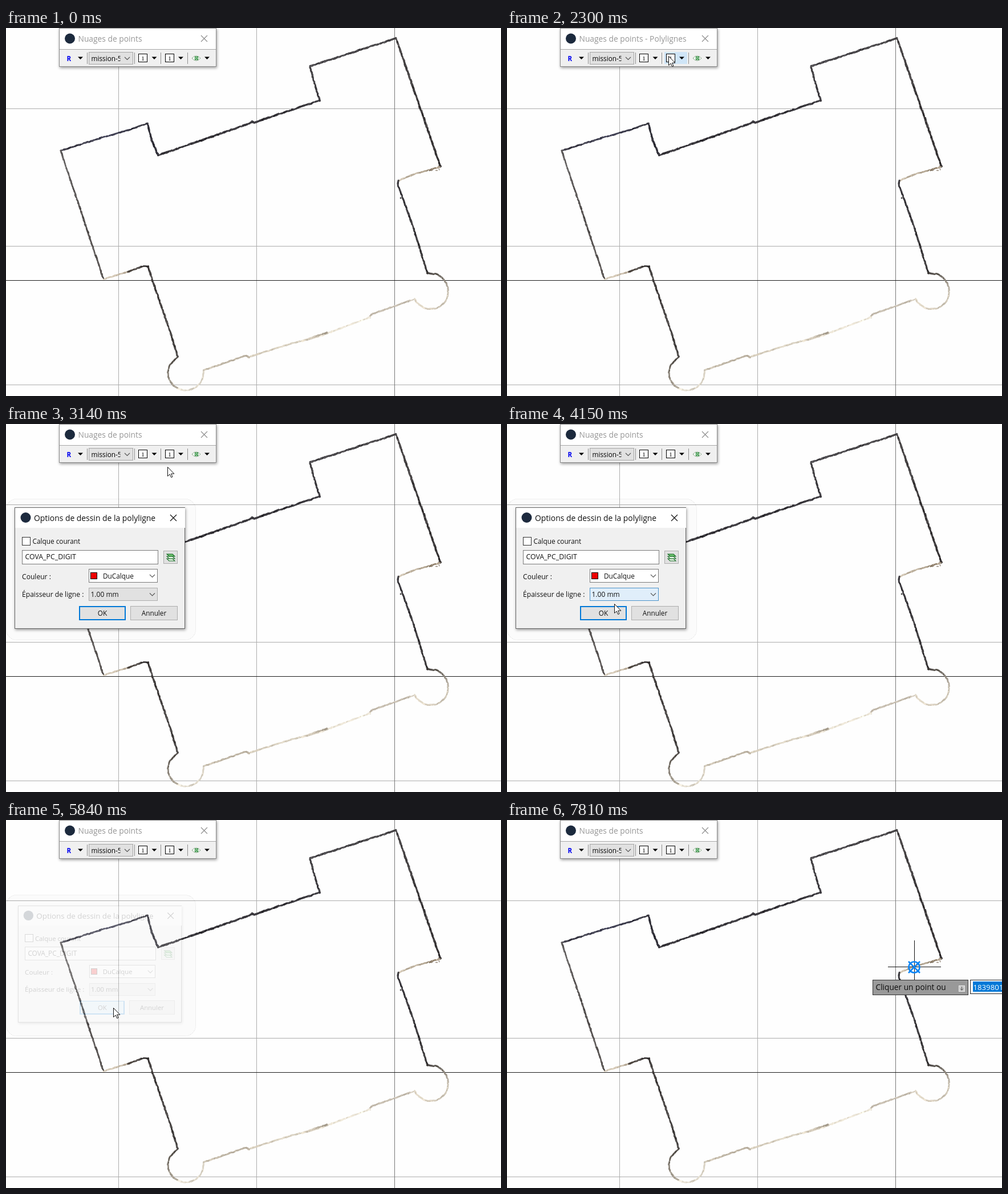
Animation, 868 px wide and 645 px high, one loop 8000 ms. Source, as an HTML page:

```html
<!DOCTYPE html>
<html lang="fr">
<head>
<meta charset="utf-8">
<title>Nuages de points</title>
<style>
html, body { margin: 0; width: 100%; height: 100%; overflow: hidden; background: #fefefe; }
svg { display: block; }
text { font-family: "Open Sans", "Noto Sans", sans-serif; white-space: pre; }
rect, .crisp { shape-rendering: crispEdges; }
.body text { font-size: 11.8px; fill: #111; }
.chev { fill: none; stroke: #555; stroke-width: 1.1; }
</style>
</head>
<body>
<svg width="868" height="645" viewBox="0 0 868 645">
  <defs>
    <filter id="soft" x="-10%" y="-20%" width="120%" height="150%">
      <feDropShadow dx="1" dy="2" stdDeviation="2.5" flood-opacity=".4"/>
    </filter>
    <path id="drop" d="M0 0H9L4.5 4.6Z"/>
    <path id="chev" class="chev" d="M0 0L4.5 4.5L9 0"/>
    <path id="cross" d="M0 0L11 11M11 0L0 11"/>
    <clipPath id="comboClip"><rect x="146" y="42" width="54.5" height="22"/></clipPath>
  </defs>
  <rect width="868" height="645" fill="#fefefe"/>
  <g class="crisp" fill="none" stroke="#adadad">
    <path d="M197.5 0V645M439.5 0V645M0 141.5H868M0 382.5H868M0 625.5H868"/>
    <path d="M681.5 0V645" stroke="#777"/>
    <path d="M0 442.5H868" stroke="#1c1c1c"/>
  </g>
  <g id="cloud" fill="none" stroke-linecap="round"></g>

  <g id="bar" filter="url(#soft)">
    <rect x="93.5" y=".5" width="275" height="67" fill="#fff" stroke="#8c8c8c"/>
    <rect x="94" y="38" width="274" height="29" fill="#f0f0f0"/>
    <path class="crisp" d="M94 37.5H368" stroke="#a8a8a8"/>
    <circle cx="112" cy="18.5" r="9" fill="#1d2a3e"/>
    <text id="barTitle" x="126.5" y="24" font-size="13.8"></text>
    <use id="barClose" href="#cross" x="342" y="13" stroke-width="1.1"/>
    <g id="hots"></g>
    <path class="crisp" d="M142.5 43V63M225.5 43V63M271.5 43V63M318.5 43V63" stroke="#8e8e8e"/>
    <text x="106.5" y="57.5" font-size="11.5" font-weight="700" fill="#0000f0">R</text>
    <rect x="145.5" y="42.5" width="77" height="21" fill="#e1e1e1" stroke="#a5a5a5"/>
    <text x="149.5" y="57.5" font-size="11.8" clip-path="url(#comboClip)">mission-5</text>
    <use href="#chev" x="208" y="51"/>
    <g fill="#fff" stroke="#000">
      <rect x="232.5" y="45.5" width="15" height="14"/>
      <rect x="279.5" y="45.5" width="15" height="14"/>
    </g>
    <g font-size="11" text-anchor="middle">
      <text x="240" y="57" style="font-family:'Liberation Serif',serif">1</text>
      <text x="287" y="57" style="font-family:'Liberation Serif',serif">1</text>
    </g>
    <path d="M326 53Q333.500 44.500 341 53Q333.500 61.500 326 53Z" fill="#fff" stroke="#86a886"/>
    <rect x="331.500" y="50.500" width="5" height="5" fill="#cfe8cf" stroke="#17802b"/>
    <rect x="333" y="52" width="2" height="2" fill="#17802b"/>
    <use href="#drop" x="126" y="50.500"/><use href="#drop" x="255.500" y="50.500"/>
    <use href="#drop" x="302" y="50.500"/><use href="#drop" x="348" y="50.500"/>
  </g>

  <g id="dialog">
    <rect x=".5" y="131.500" width="332" height="247" rx="18" fill="#000" fill-opacity=".012" stroke="#000" stroke-opacity=".05"/>
    <g id="panel" class="body">
      <g filter="url(#soft)">
        <rect x="15.500" y="146.500" width="298" height="212" fill="#f0f0f0" stroke="#666"/>
      </g>
      <rect x="16" y="147" width="298" height="35" fill="#fff"/>
      <circle cx="34.500" cy="164" r="9" fill="#1d2a3e"/>
      <text x="49" y="169.500" style="font-size:13.9px">Options de dessin de la polyligne</text>
      <use href="#cross" x="288" y="159" stroke="#111" stroke-width="1.200"/>
      <rect x="28.500" y="198.500" width="14" height="14" fill="#fff" stroke="#333"/>
      <text x="46.500" y="210">Calque courant</text>
      <rect id="field" x="28.500" y="221.500" width="238" height="24" fill="#fff"/>
      <text x="33.500" y="237" style="font-size:12.3px">COVA_PC_DIGIT</text>
      <rect x="276.500" y="222.500" width="24" height="22" fill="#e1e1e1" stroke="#adadad"/>
      <g fill="#e9f7e6" stroke="#176b26" stroke-width="1.100">
        <path d="M282 236H292L296 240H286Z"/>
        <path d="M282 232H292L296 236H286Z"/>
        <path d="M282 228H292L296 232H286Z" fill="#6fc46f"/>
      </g>
      <text x="28" y="272" style="font-size:12.100px">Couleur :</text>
      <rect id="colour" x="145.500" y="254.500" width="120" height="23" fill="#fff"/>
      <rect x="148.500" y="260.500" width="11" height="11" fill="#f00000" stroke="#000"/>
      <text x="170" y="270.500">DuCalque</text>
      <use href="#chev" x="252" y="264"/>
      <text x="28" y="303" style="font-size:12.100px">Épaisseur de ligne :</text>
      <rect id="width" x="145.500" y="287.500" width="120" height="22"/>
      <text x="148.500" y="303" style="font-size:12px">1.00 mm</text>
      <use href="#chev" x="252" y="296.500"/>
      <rect id="ok" x="129" y="320" width="80" height="23" stroke="#0078d7" stroke-width="2"/>
      <text x="169" y="336" text-anchor="middle">OK</text>
      <rect x="218.500" y="319.500" width="82" height="24" fill="#e1e1e1" stroke="#adadad"/>
      <text x="259.500" y="336" text-anchor="middle">Annuler</text>
    </g>
  </g>

  <path id="arrow" d="M.5 .5V16.500L4.200 13.100L6.700 18.600L9 17.600L6.600 12.200H11.800Z" fill="#fff" stroke="#111"/>
  <g id="picker">
    <path class="crisp" d="M-46 -.5H47M.5 -47V46" stroke="#111"/>
    <g id="snap" fill="none" stroke="#0a84f5" stroke-width="2.600">
      <circle r="9.500"/><path d="M-10 -10L10 10M10 -10L-10 10"/>
    </g>
    <rect x="-72.500" y="22.500" width="167" height="26" fill="#999" stroke="#333"/>
    <text x="-67.500" y="39.500" font-size="13.700" fill="#0c0c0c">Cliquer un point ou</text>
    <rect x="78.500" y="32.500" width="10" height="10" fill="#c9c9c9" stroke="#e8e8e8"/>
    <path d="M83.500 34V40M81 37.500L83.500 40.500L86 37.500" fill="none" stroke="#555"/>
    <rect x="98.500" y="22.500" width="110" height="24" fill="#fff" stroke="#222"/>
    <rect x="103" y="25" width="96" height="18" fill="#0078d7"/>
    <text id="coord" x="103.500" y="39.500" font-size="13.200" fill="#fff"></text>
  </g>
</svg>
<script>
const LOOP = 8000;
const $ = id => document.getElementById(id);
const set = (el, attrs) => { for (const k in attrs) el.setAttribute(k, attrs[k]); };
const make = (tag, attrs, parent) => {
  const el = document.createElementNS("http://www.w3.org/2000/svg", tag);
  set(el, attrs);
  return parent.appendChild(el);
};
const mix = (a, b, p) => a + (b - a) * p;

// Walls of the scanned building: path, start and end RGB, thickness
const dark = [58, 56, 61], grey = [88, 84, 82], sand = [222, 213, 196], pale = [236, 230, 216];
const walls = [
  ["M96 215L172 191", [66, 64, 74], [62, 62, 80], 3],
  ["M172 191L214 179L248 167", [70, 70, 92], [50, 49, 57], 3],
  ["M248 167L256 198L267 223", [48, 47, 56], [50, 49, 57], 3.6],
  ["M267 223L428 167L431 164L434 166L550 127", dark, dark, 3.6],
  ["M550 127L541 97L533 67", dark, [70, 68, 70], 3.2],
  ["M533 67L684 18", [72, 70, 74], [72, 70, 72], 3.6],
  ["M684 18L762 243", [72, 69, 70], [52, 49, 50], 3.6],
  ["M762 243L716 256L688 268", [170, 155, 135], [205, 194, 176], 3],
  ["M688 268L687 274L693 290L715 352L739 430", dark, [56, 54, 55], 3.4],
  ["M739 430L752 431A30.5 30.5 0 0 1 775 459", [70, 66, 63], [190, 181, 167], 3],
  ["M775 459A30.5 30.5 0 0 1 717 475", [205, 197, 182], sand, 3],
  ["M717 475L640 502L638 507", [206, 198, 184], [190, 181, 167], 3],
  ["M638 507L548 541L500 553L425 577", pale, [214, 205, 188], 3],
  ["M562 534L520 549", [170, 160, 145], sand, 3.5],
  ["M427 577L421 574L346 600", [180, 170, 154], [203, 194, 178], 3],
  ["M346 600A31 31 0 0 1 300 631", [205, 198, 184], pale, 3],
  ["M300 631A31 31 0 0 1 287 591L301 576", [190, 182, 168], [75, 70, 66], 3],
  ["M301 576L286 527L257 443L249 418", [72, 69, 68], [70, 66, 65], 3.4],
  ["M249 418L242 417L212 428", [50, 47, 48], [100, 92, 84], 3.2],
  ["M212 428L171 440", [185, 172, 154], [228, 218, 200], 3],
  ["M171 440L96 215", grey, [98, 95, 95], 3]
];
let seed = 7;
const rnd = () => (seed = seed * 16807 % 2147483647) / 2147483647;

function drawCloud() {
  for (const [d, from, to, w] of walls) {
    const line = make("path", { d, stroke: "none" }, $("cloud"));
    const len = line.getTotalLength();
    for (let s = 0; s < len; s += 2.4) {
      const a = line.getPointAtLength(s), b = line.getPointAtLength(Math.min(len, s + 4));
      const tone = (rnd() + rnd() - 1) * 28;
      const rgb = from.map((c, i) => Math.round(mix(c, to[i], s / len) + tone));
      const off = () => (rnd() - .5) * 1.5;
      make("path", {
        d: `M${a.x + off()} ${a.y + off()}L${b.x + off()} ${b.y + off()}`,
        stroke: `rgb(${rgb})`, "stroke-width": w * (.55 + rnd() * .45)
      }, $("cloud"));
    }
  }
  // Loose points beside the east step
  for (let i = 0; i < 16; i++) {
    const x = 742 + rnd() * 18;
    make("circle", { cx: x, cy: 247 + (rnd() - .3) * 5, r: .8, fill: "#6d5c48" }, $("cloud"));
  }
  make("circle", { cx: 692, cy: 298, r: 1.3, fill: "#333" }, $("cloud"));
}

// Pointer moves: start, end, steps, then [progress, x, y] keys
const moves = [
  [460, 690, 4, [.25, 615, 527], [1, 423, 168]],
  [1020, 1770, 12, [0, 423, 168], [.417, 125, 52], [.583, 307, 53], [1, 283, 49]],
  [3030, 3810, 12, [0, 283, 49], [.167, 283, 75], [1, 200, 273]],
  [3880, 4630, 11, [0, 200, 273], [.364, 188, 315], [1, 185, 323]],
  [4690, 4890, 4, [0, 185, 323], [1, 188, 329]],
  [6240, 6590, 6, [0, 188, 329], [1, 618, 258]],
  [7250, 7810, 9, [0, 697, 360], [.4, 735, 590], [.8, 717, 300], [1, 714, 258]]
];

function pointer(t) {
  const move = moves.filter(m => t >= m[0]).pop();
  if (!move) return null;
  const [start, end, n, ...keys] = move;
  const step = Math.floor((t - start) / ((end - start) / (n - 1)) + .01) + 1;
  const p = Math.min(1, step / n);
  let i = keys.findIndex(k => k[0] >= p - .001);
  if (i < 1) i = 1;
  const [a, b] = [keys[i - 1], keys[i]];
  const q = Math.max(0, Math.min(1, (p - a[0]) / (b[0] - a[0])));
  return { x: Math.round(mix(a[1], b[1], q)), y: Math.round(mix(a[2], b[2], q)), p };
}

// Value of the last [time, value] pair reached
const held = (t, pairs) => pairs.reduce((v, [at, next]) => t >= at ? next : v, 0);
const fade = [[2500, .3], [2567, .65], [2633, .9], [2700, 1], [5645, .92], [5710, .7], [5775, .42], [5840, .17], [5910, 0]];

const hots = [99, 229, 276, 321].map(x => make("rect",
  { x, y: 42, width: 40, height: 21, fill: "#cfe5f7" }, $("hots")));

function draw(t) {
  const c = pointer(t);
  const over = (x, y, w, h) => !!c && c.x >= x && c.x < x + w && c.y >= y && c.y < y + h;
  const picking = t >= 7250;

  hots.forEach((h, i) => {
    const on = over([99, 229, 276, 321][i], 42, 40, 22);
    set(h, { visibility: on ? "visible" : "hidden" });
  });
  const active = t >= 1840 && t < 2240;
  $("barTitle").textContent = "Nuages de points" + (over(276, 42, 40, 22) ? " - Polylignes" : "");
  set($("barTitle"), { fill: active ? "#111" : "#969696" });
  set($("barClose"), { stroke: active ? "#111" : "#8c8c8c" });

  const alpha = held(t, fade);
  const scale = alpha >= 1 ? 1 : .955 + .045 * alpha;
  set($("dialog"), { visibility: alpha ? "visible" : "hidden" });
  set($("panel"), {
    opacity: alpha,
    transform: `translate(164.5 252.5) scale(${scale}) translate(-164.5 -252.5)`
  });
  set($("field"), { stroke: over(28, 221, 238, 25) ? "#171717" : "#7a7a7a" });
  set($("colour"), { stroke: over(145, 254, 121, 24) ? "#171717" : "#7a7a7a" });
  const thick = over(145, 287, 121, 30);
  set($("width"), { fill: thick ? "#e0eefa" : "#e1e1e1", stroke: thick ? "#4c93c9" : "#adadad" });
  set($("ok"), { fill: t >= 5580 ? "#cce4f7" : over(128, 319, 82, 25) ? "#e5f1fb" : "#e1e1e1" });

  set($("arrow"), { visibility: c && !picking ? "visible" : "hidden" });
  set($("picker"), { display: picking ? "inline" : "none" });
  if (!c) return;
  set($(picking ? "picker" : "arrow"), { transform: `translate(${c.x} ${c.y})` });
  set($("snap"), { display: c.p > .99 ? "inline" : "none" });
  $("coord").textContent = Math.round(1839801 + (c.x - 714) * .12) + ".4127";
}

drawCloud();
const tick = () => { draw(performance.now() % LOOP); requestAnimationFrame(tick); };
tick();
</script>
</body>
</html>
```
